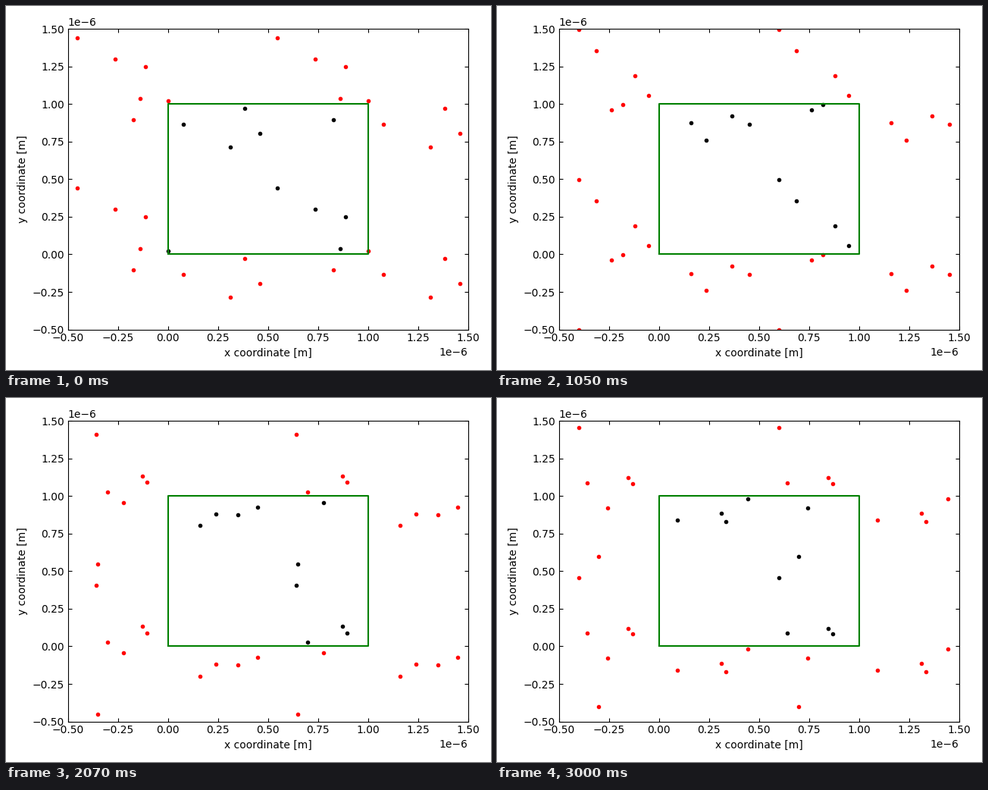
A matplotlib script for the animation above (3.03 s loop, 640 by 480 pixels).

```python
import itertools

import matplotlib.pyplot as plt
import numpy as np
from matplotlib.animation import FuncAnimation

FRAMES = 101
INTERVAL = 30
BOX = 1e-6

# Each particle drifts straight from its start to its end, in box lengths;
# leaving the box on one side means entering it on the other.
START = np.array([(.077, .867), (.384, .9725), (.312, .716), (.459, .804),
                  (.827, .894), (.546, .441), (.736, .300), (.887, .249),
                  (.8605, .0375), (.001, .0225)])
END = np.array([(.312, .886), (.3345, .8315), (.092, .842), (.444, .981),
                (.641, 1.088), (.698, .598), (.5995, .456), (.867, .081),
                (.743, -.080), (-.154, .120)])

# The eight neighbouring cells of the periodic box
SHIFTS = np.array([s for s in itertools.product((-1, 0, 1), repeat=2) if any(s)])

plt.rcParams.update({
    "xtick.direction": "in", "ytick.direction": "in",
    "xtick.top": True, "ytick.right": True,
})

fig, ax = plt.subplots(figsize=(6.4, 4.8), dpi=100)
ax.set(xlim=(-0.5 * BOX, 1.5 * BOX), ylim=(-0.5 * BOX, 1.5 * BOX),
       xlabel="x coordinate [m]", ylabel="y coordinate [m]")

inside, = ax.plot([], [], "k.")
images, = ax.plot([], [], "r.")
ax.plot([0, BOX, BOX, 0, 0], [0, 0, BOX, BOX, 0], color="green")
fig.tight_layout()


def update(step):
    t = step / (FRAMES - 1)
    pos = (START + t * (END - START)) % 1.0
    copies = (pos + SHIFTS[:, None]).reshape(-1, 2)
    inside.set_data(*(BOX * pos.T))
    images.set_data(*(BOX * copies.T))
    return inside, images


anim = FuncAnimation(fig, update, frames=FRAMES, interval=INTERVAL,
                     repeat=True, repeat_delay=0)
plt.show()
```
